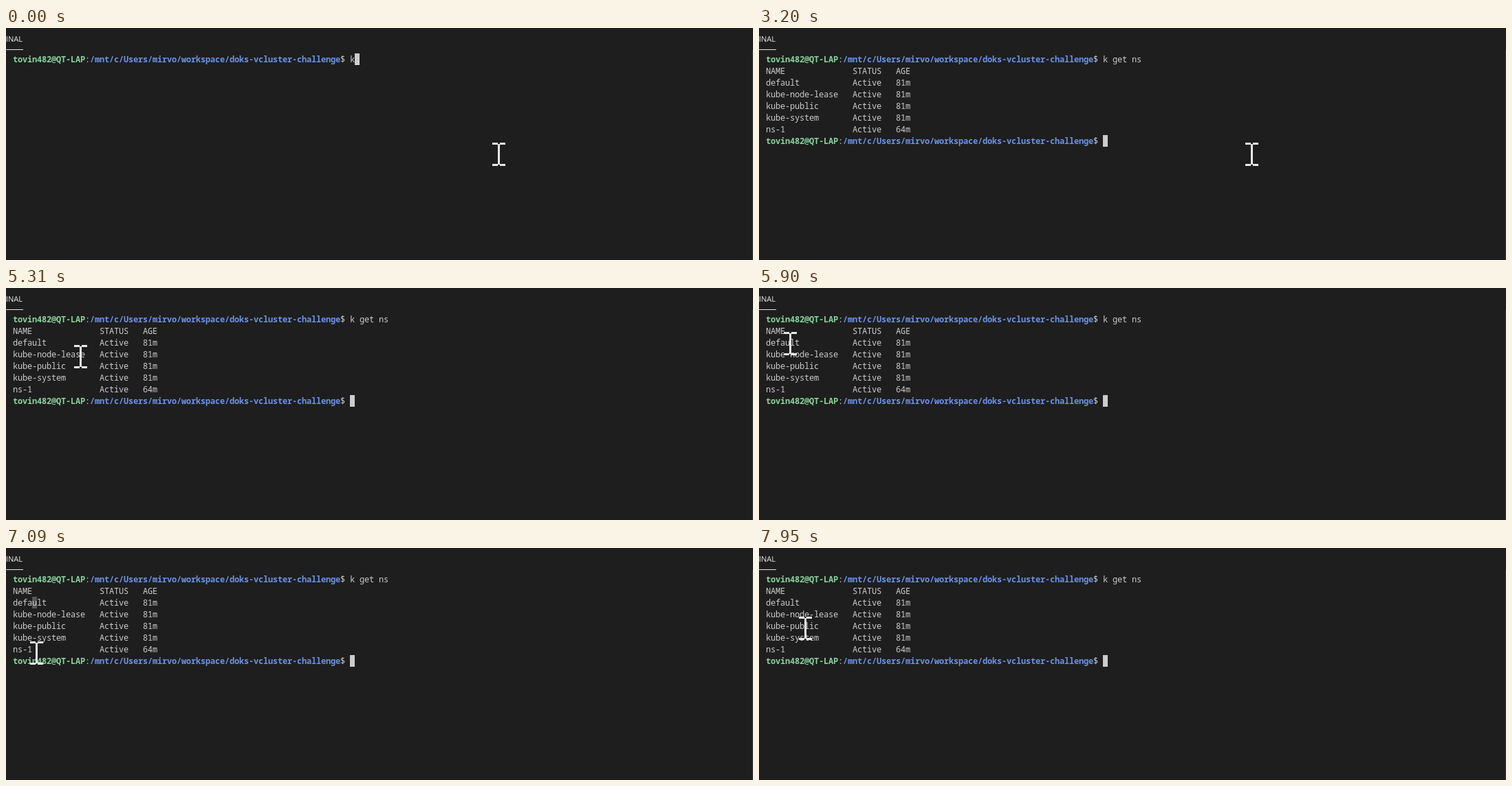
An HTML page with a canvas for the animation above (8000 ms loop, 1086x338 px).

```html
<!DOCTYPE html>
<html lang="en">
<head>
<meta charset="utf-8">
<title>Terminal</title>
<style>
html, body { margin: 0; width: 100%; height: 100%; overflow: hidden; background: #1e1e1e; }
canvas { display: block; }
</style>
</head>
<body>
<canvas id="stage" width="1086" height="338"></canvas>
<script>
const ctx = document.getElementById('stage').getContext('2d');
const LOOP = 8000, CELL = 7, ROW = 17, LEFT = 10, TOP = 37;
const TEXT = '#cccccc', GREEN = '#86d49b', BLUE = '#6a93e8';
const ENTER = 2060, OUTPUT = 3200, SELECT = 6340, DESELECT = 7330;

const command = 'k get ns';
const bursts = [
  { start: 60, step: 60, count: 1 },
  { start: 1460, step: 65, count: 3 },
  { start: 1730, step: 60, count: 2 },
  { start: 1940, step: 60, count: 1 }
];

const namespaces = ['default', 'kube-node-lease', 'kube-public', 'kube-system', 'ns-1'];

// Pointer sweeps: cubic curves, each starting where the last one ended.
const home = [716.5, 184];
const sweeps = [
  { start: 4790, step: 65, count: 13, curve: [[266, 130], [43, 96], [48.5, 80]] },
  { start: 5780, step: 60, count: 5, curve: [[100, 110], [9, 61], [45, 83]] },
  { start: 6170, step: 85, count: 5, curve: [[52, 85], [50, 85], [42.5, 84]] },
  { start: 6720, step: 61.6, count: 12, curve: [[20, 110], [79, 192], [9.5, 160]] },
  { start: 7540, step: 68, count: 7, curve: [[60, 200], [140, 150], [67.5, 117]] }
];

function stepsDone(t, { start, step, count }) {
  return Math.max(0, Math.min(count, Math.floor((t - start) / step) + 1));
}

function fill(color, x, y, w, h) {
  ctx.fillStyle = color;
  ctx.fillRect(x, y, w, h);
}

// Writes text on the character grid and returns the next column.
function write(text, col, row, color = TEXT, weight = 500) {
  ctx.font = `${weight} 12px "Noto Sans Mono", "DejaVu Sans Mono", monospace`;
  ctx.fillStyle = color;
  for (const ch of text) ctx.fillText(ch, LEFT + CELL * col++, TOP + ROW * row + 13);
  return col;
}

function block(col, row, color = TEXT) {
  fill(color, LEFT + CELL * col, TOP + ROW * row, CELL, ROW);
}

function prompt(row) {
  let col = write('tovin482@QT-LAP', 0, row, GREEN, 700);
  col = write(':', col, row);
  col = write('/mnt/c/Users/mirvo/workspace/doks-vcluster-challenge', col, row, BLUE, 700);
  return write('$ ', col, row);
}

function tableRow(row, name, status, age) {
  write(name, 0, row);
  write(status, 18, row);
  write(age, 27, row);
}

function pointerAt(t) {
  let from = home;
  for (const sweep of sweeps) {
    const u = stepsDone(t, sweep) / sweep.count, r = 1 - u;
    const [a, b, to] = sweep.curve;
    if (u < 1) {
      return from.map((p, i) =>
        r ** 3 * p + 3 * r * r * u * a[i] + 3 * r * u * u * b[i] + u ** 3 * to[i]);
    }
    from = to;
  }
  return from;
}

function drawPointer([cx, cy]) {
  const x = Math.round(cx - 9.5), y = Math.round(cy - 17), color = '#e8e8e8';
  for (const top of [y, y + 31]) {
    fill(color, x, top, 8, 3);
    fill(color, x + 11, top, 8, 3);
  }
  fill(color, x + 8, y + 2, 3, 30);
}

function draw(t) {
  fill('#1e1e1e', 0, 0, 1086, 338);
  ctx.font = '500 11px "Open Sans", "Noto Sans", sans-serif';
  ctx.fillStyle = '#e7e7e7';
  ctx.fillText('INAL', 0, 20);
  fill('#e7e7e7', 0, 31, 25, 1);
  fill('#3a3d3a', 1085, 32, 1, 306);

  const typed = bursts.reduce((n, burst) => n + stepsDone(t, burst), 1);
  const end = write(command.slice(0, typed), prompt(0), 0);
  if (t < ENTER) {
    block(end, 0);
  } else if (t < OUTPUT) {
    block(0, 1);
  } else {
    if (t >= SELECT && t < DESELECT) block(4, 2, '#565656');
    tableRow(1, 'NAME', 'STATUS', 'AGE');
    namespaces.forEach((name, i) => tableRow(i + 2, name, 'Active', name === 'ns-1' ? '64m' : '81m'));
    block(prompt(7), 7);
  }
  drawPointer(pointerAt(t));
}

function frame() {
  draw(performance.now() % LOOP);
  requestAnimationFrame(frame);
}
frame();
</script>
</body>
</html>
```
